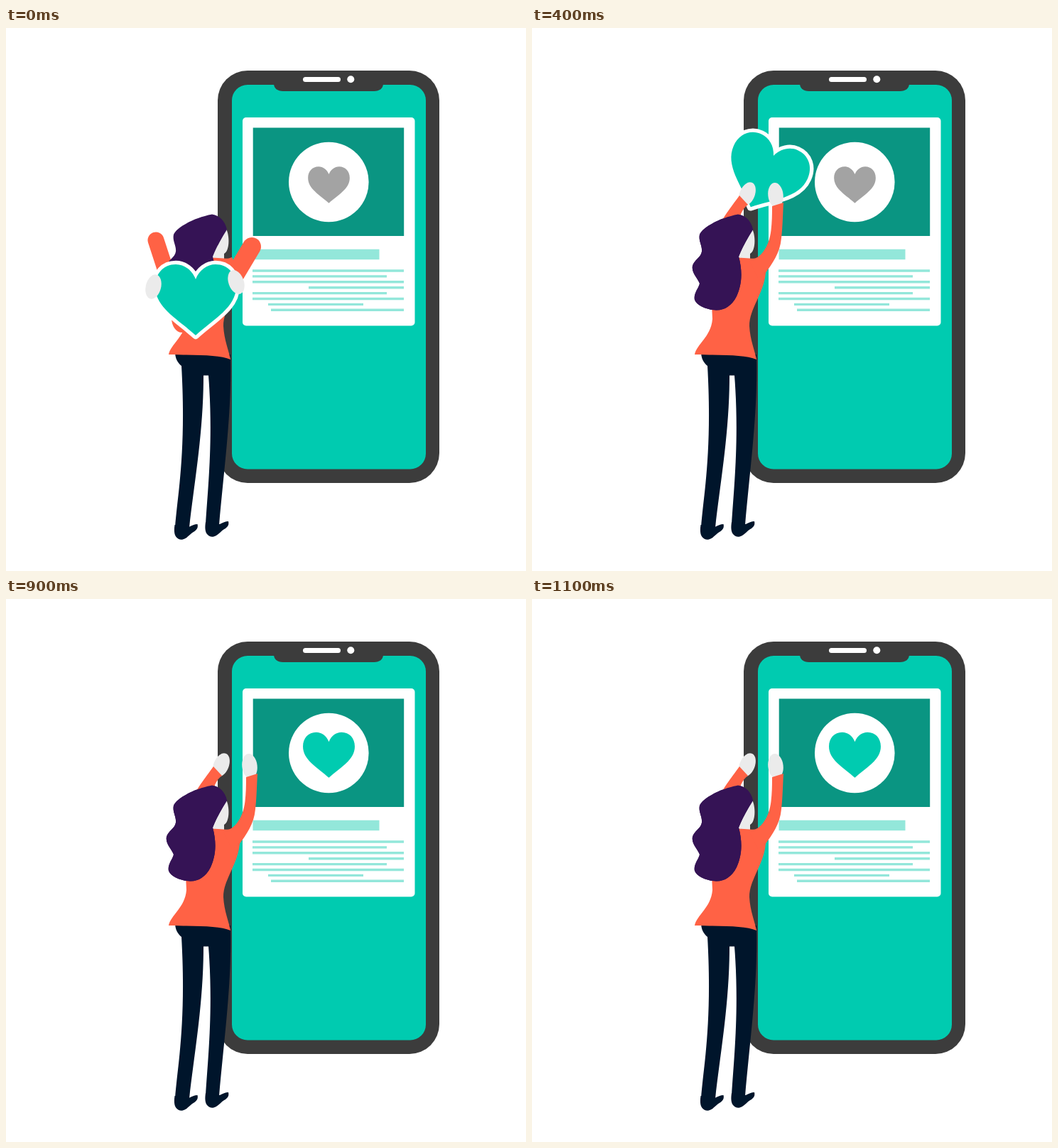
These frames come from a looping animation (732x765 px, 1600 ms). An HTML page:

```html
<!DOCTYPE html>
<html lang="en">
<head>
<meta charset="utf-8">
<title>Giving a heart</title>
<style>
html, body { margin: 0; width: 100%; height: 100%; overflow: hidden; background: #fff; }
svg { display: block; width: 732px; height: 765px; }
.skin { fill: #ebebeb; }
.top { fill: #ff6245; }
.sleeve { stroke: #ff6245; stroke-linecap: round; }
#heart { fill: #00cbb0; stroke: #fff; stroke-width: 10.5; stroke-linejoin: round; paint-order: stroke; }
#shape { vector-effect: non-scaling-stroke; }
</style>
</head>
<body>
<svg viewBox="0 0 732 765">
  <defs>
    <path id="shape" d="M0 0C5-13 16-21 28-21C45-21 57-8 57 10C57 40 25 56 0 79C-25 56-57 40-57 10C-57-8-45-21-28-21C-16-21-5-13 0 0Z"/>
    <path id="foot" d="M0-2L20 1C24-1 28-3 32-3C33 1 32 4 28 7C22 10 19 15 15 17C10 20 5 19 2 15C-1 11-1 5 0-2Z"/>
  </defs>

  <g id="phone">
    <rect x="298" y="60" width="312" height="581" rx="42" fill="#3c3c3c"/>
    <rect x="318" y="80" width="273" height="541.5" rx="22" fill="#00cbb0"/>
    <path d="M377 78H531C531 85 526 89 518 89H390C382 89 377 85 377 78Z" fill="#3c3c3c"/>
    <rect x="418" y="69" width="53" height="7" rx="3.5" fill="#fff"/>
    <circle cx="485.3" cy="72.3" r="5" fill="#fff"/>
    <rect x="333" y="126" width="242.5" height="293.5" rx="5" fill="#fff"/>
    <rect x="347.7" y="140.5" width="212.5" height="152.5" fill="#0a9582"/>
    <circle cx="454.3" cy="217" r="56.3" fill="#fff"/>
    <use href="#shape" transform="translate(454.5 206) scale(.515)" fill="#a3a3a3"/>
    <rect x="347.5" y="311.7" width="178" height="14.5" fill="#93e7da"/>
    <path id="lines" stroke="#93e7da" stroke-width="3.4"/>
  </g>

  <g id="body">
    <g fill="#00152b">
      <path d="M238 456L316 460C318 540 308 610 300 700H281C284 650 292 580 285 489.5H278C278 570 265 640 258 704H238C241 660 254 600 247 476C242 472 238 466 238 456Z"/>
      <use href="#foot" x="237.5" y="702"/>
      <use href="#foot" x="281" y="698"/>
    </g>
    <path class="skin" d="M310 283C315 293 315 314 307 318V328L288 326Z"/>
    <path class="top" d="M253 390L290 324C302 323 310 327 318 323L329 345C326 375 306 395 306 420C307 440 314 455 316 467C300 460 270 461 229 460C232 445 252 435 254 410Z"/>
  </g>

  <g id="arms0">
    <path class="sleeve" stroke-width="23" d="M211 299L226 345"/>
    <path class="sleeve" stroke-width="26" d="M346 308L318 355"/>
    <path class="top" d="M233 409C233 420 240 430 249 429L262 432L250 410Z"/>
  </g>
  <path id="hair" fill="#351355" d="M290 262.5C299 264 308 270 311 284C304 295 297 307 291 322C297 345 295 362 288 378C281 392 270 398 259 397.500C246 397 232 391 229 383C227 374 235 366 236 360C234 353 224 345 226 335C228 327 238 323 239 315C240 307 234 300 236 291C239 282 262 268 290 262.5Z"/>

  <use id="heart" href="#shape"/>
  <ellipse id="left" class="skin" rx="10.7" ry="17.5"/>
  <ellipse id="right" class="skin" rx="10.7" ry="17.5"/>

  <g id="arms1" class="top">
    <path d="M261 226C245 236 222 256 208 278C207 282 210 286 213 291L232 325L240 318C233 293 233 289 236 283C245 268 258 254 271 243Z"/>
    <path d="M300 326C325 328 350 306 357 288C359 282 358 278 353 271C344 260 332 248 319.5 236L337 215C352 228 370 245 381 263C383 267 382 272 380 277C368 305 350 320 329 353L318 360Z"/>
  </g>
  <g id="arms2" class="top">
    <path d="M292 236C285 246 276 257 268 270H292C293 262 297 254 304 249Z"/>
    <path d="M306 328C322 325 334 308 336.5 285C338 272 338 262 338 251L354 246C353 262 353 278 351 296C349 318 338 332 328 346L318 352Z"/>
  </g>
  <use id="hairOver" href="#hair"/>
</svg>
<script>
const $ = id => document.getElementById(id);

// Eight text lines: some are indented, some end early.
const indent = { 3: 79, 6: 22, 7: 26 };
const cut = { 1: 24, 4: 24, 6: 57 };
let lines = '';
for (let i = 0; i < 8; i++) {
  lines += `M${347 + (indent[i] || 0)} ${342 + i * 7.9}H${560 - (cut[i] || 0)}`;
}
$('lines').setAttribute('d', lines);

// Each pose: left and right hand as x, y, turn
const poses = [
  { left: [207.5, 364.5, 14], right: [324, 358, -20] },
  { left: [267, 229, 20], right: [325, 221, -20] },
  { left: [303, 234, 22], right: [343, 235.5, -6] }
];

function heartAt(t) {
  if (t < 200) return { x: 267, y: 354 };
  if (t < 400) return { x: 296, y: 171 };
  if (t < 900) {
    // Let go at 600: shrinks and speeds up toward the circle.
    const k = t < 600 ? 0 : t < 700 ? 1 : 2;
    return {
      x: 340 + 22.25 * k + 12.25 * k * k,
      y: 180 + 16.25 * k - 4.25 * k * k,
      turn: 24,
      size: 1 - 0.22 * k,
      squash: k ? 0.88 : 1
    };
  }
  const beat = t >= 1000 && t < 1100 ? 1 : 0;
  return { x: 454.5, y: 201.3 - beat, size: 0.64 + 0.05 * beat };
}

function show(id, on) {
  $(id).style.display = on ? '' : 'none';
}

function place(id, x, y, turn, sx = 1, sy = sx) {
  $(id).setAttribute('transform', `translate(${x} ${y}) rotate(${turn}) scale(${sx} ${sy})`);
}

function draw(t) {
  const pose = Math.min(2, Math.floor(t / 200));
  poses.forEach((_, i) => show('arms' + i, i === pose));
  show('hairOver', pose > 0);
  for (const side of ['left', 'right']) place(side, ...poses[pose][side]);
  const { x, y, turn = 0, size = 1, squash = 1 } = heartAt(t);
  place('heart', x, y, turn, size, size * squash);
}

// The first arm group sits behind the heart, the others in front of it.
const start = performance.now();
function tick() {
  draw((performance.now() - start) % 1600);
  requestAnimationFrame(tick);
}
tick();
</script>
</body>
</html>
```
